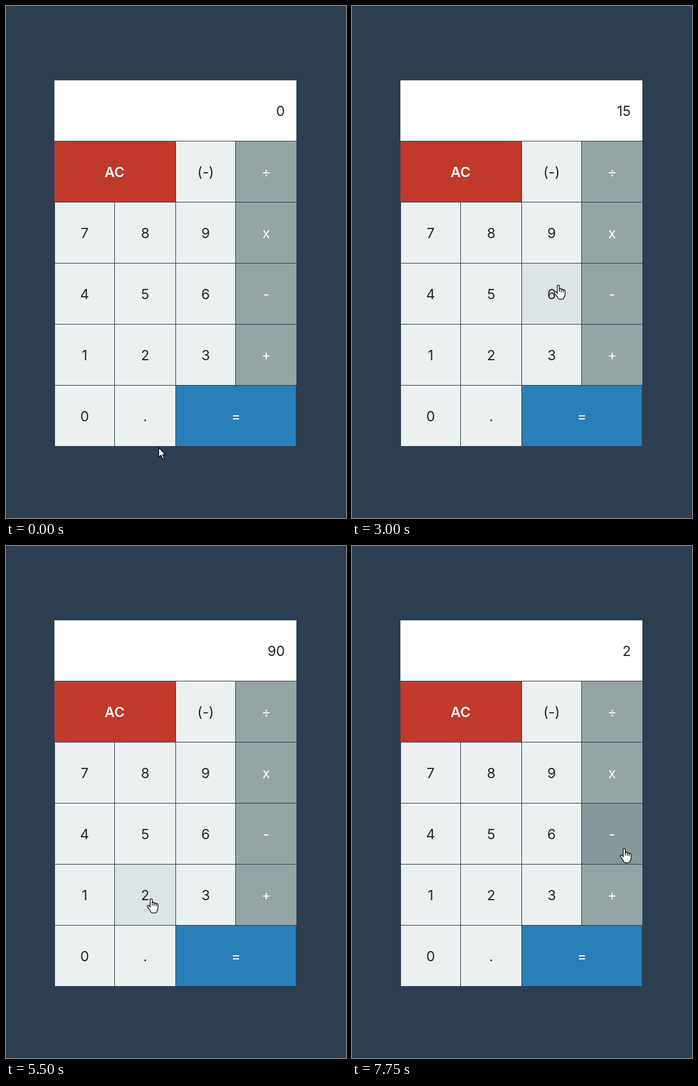
These frames come from a looping animation (562 px wide and 847 px high, 8000 ms). An HTML page:

```html
<!DOCTYPE html>
<html lang="en">
<head>
<meta charset="utf-8">
<title>Calculator</title>
<style>
  html, body { margin: 0; width: 100%; height: 100%; overflow: hidden; background: #2d3e50; }
  svg { display: block; width: 562px; height: 847px; }
  text {
    font: 400 23px Inter, Roboto, sans-serif;
    font-feature-settings: "calt" 0;
    text-anchor: middle;
    fill: #242424;
  }
  .light { fill: #ecf0f1; }
  .light.hover { fill: #dce4e6; }
  .op { fill: #95a5a5; }
  .op.hover { fill: #86989b; }
  .clear { fill: #c0392b; }
  .equals { fill: #2980b9; }
  text.on-dark { fill: #fff; }
  text.bold { font-weight: 600; }
  #readout { text-anchor: end; }
  .cursor { fill: #fff; stroke: #000; stroke-width: 1.2; stroke-linejoin: round; stroke-linecap: round; }
</style>
</head>
<body>
<svg viewBox="0 0 562 847">
  <rect x="80" y="123" width="400" height="100" fill="#fff"/>
  <text id="readout" x="461" y="182">0</text>
  <g id="keys"></g>
  <path id="arrow" class="cursor" d="M.5 .5V16.5L4.2 13L6.8 19.3L9.4 18.2L6.8 12H11.6Z"/>
  <g id="hand" class="cursor">
    <path d="M-1.7 2Q-1.6 .6 0 .6Q1.6 .6 1.7 2V7.2Q2 6.3 3.3 6.4Q4.8 6.5 5 8Q5.3 7.2 6.5 7.3Q8 7.4 8.2 9.1Q8.6 8.5 9.6 8.7Q11.2 9 11.3 10.8V15.5Q11.3 18.5 9.4 21V22Q8.3 24.2 4.5 24.2Q.3 24.2 -.6 22.4Q-1.2 20.5 -3 18.4L-6 14Q-7 12.2 -5.6 11.5Q-4.3 11 -3 12.6L-1.7 14.2Z"/>
    <path fill="none" d="M1.7 7.2V11.5M5 8V12M8.2 9.1V12.5"/>
  </g>
</svg>
<script>
  const LOOP = 8000;
  const LEFT = [81, 180, 281, 380], RIGHT = [179, 280, 379, 480];
  const TOP = 224, PITCH = 101, KEY_H = 100;
  const $ = id => document.getElementById(id);

  function add(tag, attrs) {
    const el = document.createElementNS("http://www.w3.org/2000/svg", tag);
    for (const name in attrs) el.setAttribute(name, attrs[name]);
    return $("keys").appendChild(el);
  }

  const keys = [];
  function addKey(label, row, x1, x2, center, kind) {
    const y = TOP + row * PITCH;
    const rect = add("rect", { x: x1, y, width: x2 - x1, height: KEY_H, class: kind });
    const tone = kind === "light" ? "" : kind === "clear" ? "on-dark bold" : "on-dark";
    add("text", { x: center, y: y + 59, class: tone }).textContent = label;
    keys.push({ rect, x1, x2, y });
  }

  addKey("AC", 0, 80, 280, 179.5, "clear");
  addKey("=", 4, 281, 479, 380, "equals");
  ["  (÷", "789x", "456-", "123+", "0.  "].forEach((line, row) => {
    [...line].forEach((char, col) => {
      if (char === " ") return;
      addKey(char === "(" ? "(-)" : char, row, LEFT[col], RIGHT[col],
        130 + col * 100, col === 3 ? "op" : "light");
    });
  });

  // time, pointer x, pointer y, readout
  const steps = [
    [0, 252, 730, "0"],
    [250, 152, 601, "0"],
    [500, 139, 587, "0"],
    [1000, 139, 587, "1"],
    [1250, 209, 510, "1"],
    [1500, 236, 481, "1"],
    [1750, 236, 481, "15"],
    [2000, 322, 455, "15"],
    [2250, 412, 398, "15"],
    [2500, 434, 378, "15"],
    [2750, 431, 381, "15"],
    [3000, 341, 461, "15"],
    [3250, 333, 473, "15"],
    [3750, 333, 473, "6"],
    [4000, 350, 491, "6"],
    [4250, 402, 539, "6"],
    [4500, 436, 563, "6"],
    [4750, 440, 567, "6"],
    [5000, 440, 567, "90"],
    [5250, 325, 580, "90"],
    [5500, 240, 583, "90"],
    [5750, 233, 596, "90"],
    [6000, 230, 608, "90"],
    [6250, 230, 614, "90"],
    [6500, 231, 590, "2"],
    [6750, 232, 578, "2"],
    [7000, 236, 579, "2"],
    [7250, 304, 592, "2"],
    [7500, 418, 543, "2"],
    [7750, 450, 500, "2"]
  ];

  let shown;
  function draw(now) {
    const time = now % LOOP;
    const step = steps.filter(s => s[0] <= time).pop();
    if (step !== shown) {
      shown = step;
      const [, x, y, value] = step;
      let overKey = false;
      for (const key of keys) {
        const over = x >= key.x1 && x < key.x2 && y >= key.y && y <= key.y + KEY_H;
        key.rect.classList.toggle("hover", over);
        overKey = overKey || over;
      }
      $("readout").textContent = value;
      for (const id of ["arrow", "hand"]) {
        $(id).setAttribute("transform", `translate(${x} ${y})`);
        $(id).style.display = (id === "hand") === overKey ? "" : "none";
      }
    }
  }

  const start = performance.now();
  function tick() {
    draw(performance.now() - start);
    requestAnimationFrame(tick);
  }
  tick();
</script>
</body>
</html>
```
